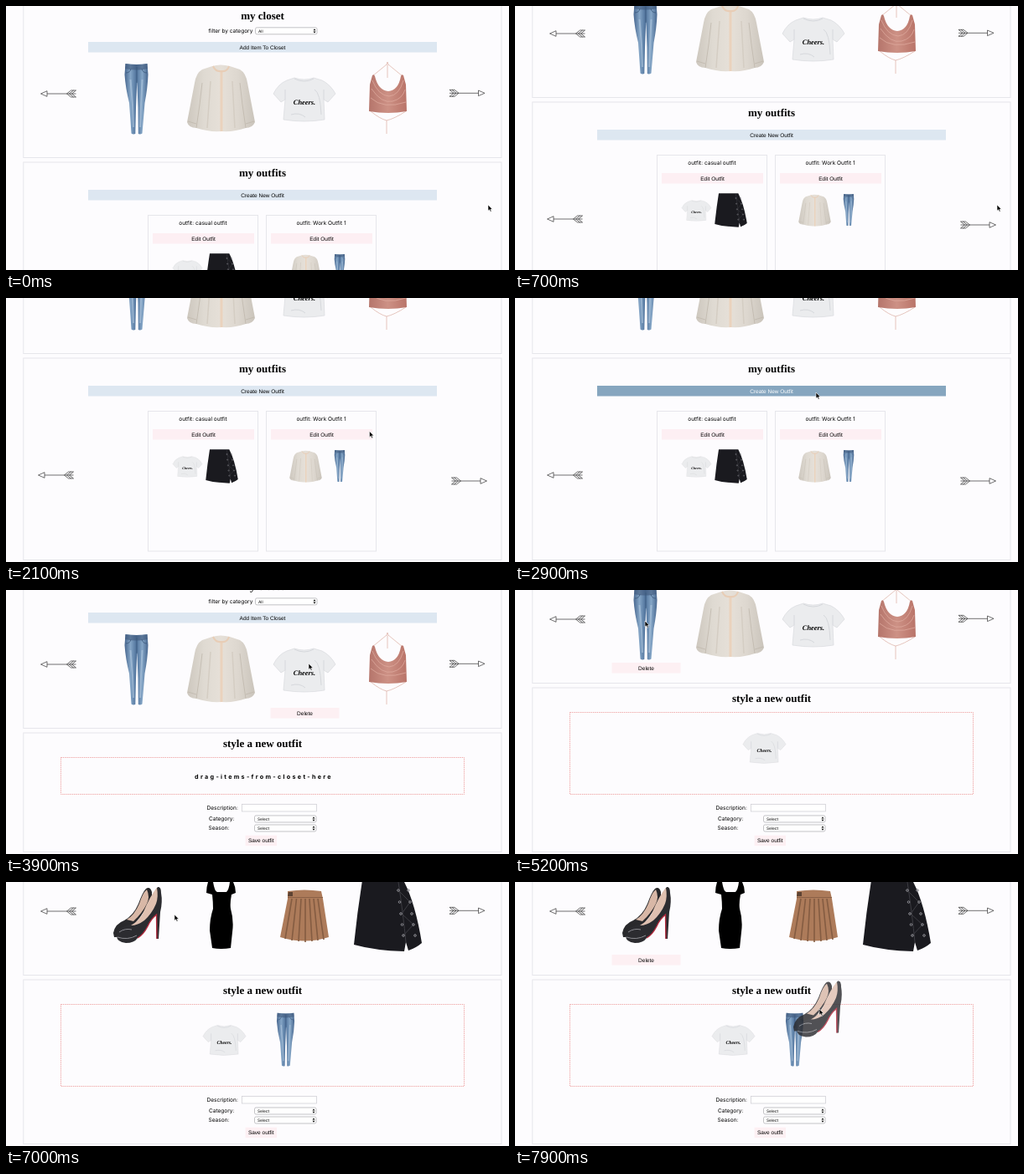
Write an HTML page that moves like this. It is 600 px wide and 316 px high and loops after 8000 ms.

```html
<!DOCTYPE html>
<html lang="en">
<head>
<meta charset="utf-8">
<title>my closet</title>
<style>
  html, body { margin: 0; width: 100%; height: 100%; overflow: hidden; background: #fdfcfe; }
  svg { display: block; width: 600px; height: 316px; }
  text { font-family: Inter, "Noto Sans", sans-serif; font-size: 6.55px; fill: #000; text-rendering: geometricPrecision; }
  .btn { font-family: "Liberation Sans", Arial, sans-serif; font-size: 6.5px; }
  .title { font: bold 13px "Liberation Serif", "Times New Roman", serif; }
  .tee { font: italic bold 8.4px "Liberation Serif", serif; }
  .opt { font-size: 4.8px; }
  .drop { font-size: 7.2px; font-weight: 700; letter-spacing: 2.3px; }
  .mid { text-anchor: middle; }
  .box { fill: none; stroke: #e6e6eb; }
  .line { fill: none; }
</style>
</head>
<body>
<svg id="stage" viewBox="0 0 600 316"></svg>
<script>
const stage = document.getElementById('stage');

// Garments: centre and drawing, all in closet page coordinates
const items = {
  jeans: [155.5, 111, `
    <path fill="url(#denim)" d="M142.500 69Q156 71 168.500 69L169.500 82Q169 98 165.500 116L162.500 152.500Q160 154 157.800 153L157.500 122 156.300 90 155 122 154.300 153Q151.500 154 149.500 152.500L147 116Q142.500 98 141.500 82Z"/>
    <path fill="#40597c" opacity=".6" d="M142.500 69Q156 71 168.500 69L169 75Q156 78 142 75Z"/>
    <path class="line" stroke="#3c587c" stroke-width=".8" d="M156 73V92M143 80Q148 80 149 75M168 80Q163 80 162 75"/>
    <path class="line" stroke="#b4cbe0" stroke-width="2" opacity=".55" d="M148.500 88L151 118 152 145M162.500 88L161 118 160 145"/>`],
  shirt: [256.5, 110, `
    <path fill="url(#cream)" d="M246 72Q256 69 267 72L279 76Q286 80 288 92L297 139Q294 146 286 146 272 151 257 150 242 151 227 146 218 146 216 139L225 92Q227 80 234 76Z"/>
    <path class="line" stroke="#bfb8ac" stroke-width=".8" d="M234 92L231 118 227 146M279 92L282 118 286 146M217 138L227 141M296 138L286 141"/>
    <path class="line" stroke="#d4cdc3" stroke-width="1.5" d="M244 90L240 146M270 90L273 146"/>
    <path class="line" stroke="#ead2bd" stroke-width="3" d="M257 77V150"/>
    <path class="line" stroke="#e8cdb6" stroke-width="2" d="M247 72Q250 79 257 78 264 79 266 72"/>`],
  tee: [356, 112, `
    <path fill="#ebecee" stroke="#d9dade" stroke-width=".7" d="M344 86Q356 90 367 86L377 89Q387 94 393 105L384 115 379 112 380 136Q356 140 331 136L333 112 328 115 319 105Q325 93 335 89Z"/>
    <path class="line" stroke="#d6d8dc" d="M344 87Q356 93 367 87M333 100V112M379 100V112M340 130Q350 127 357 133M368 100Q375 104 376 130"/>
    <text class="tee mid" x="356" y="118">Cheers.</text>`],
  halter: [455.5, 110, `
    <path class="line" stroke="#dcaea3" stroke-width=".7" d="M437 84L454 70 455 67M473 84L456 70 455 67M455 70V86M435 126Q446 135 454 137 463 135 477 126M454 137V153"/>
    <path fill="url(#rose)" d="M434 94L437 83Q439 81 440 84 444 101 456 102 468 101 471 84 472 81 474 83L477 94 478 126Q456 130 433 126Z"/>
    <path class="line" stroke="#dfab9f" opacity=".75" d="M437 89Q444 107 457 108 469 107 474 89M436 99Q448 117 461 114 473 111 476 100M435 110Q450 124 477 115"/>`],
  shoes: [157, 109, `<g transform="translate(0 70)">
    <path fill="#29292c" d="M128 61Q130 50 141 46 152 40 158 26 163 12 167 8 172 5 174 12V26Q166 32 160 42L148 56Q138 67 129 66Z"/>
    <path fill="#d8b7a6" d="M144 45Q153 40 159 26 163 13 168 9 172 18 168 26 162 38 152 47Z"/>
    <path fill="#2c2c30" d="M132 64Q133 55 144 52 153 50 160 44 170 36 174 22 177 10 181 6 185 5 185 13 187 24 184 36L182 68H179.500L179 40Q173 44 169 53 163 64 157 67 153 73 143 73 132 72 132 64Z"/>
    <path fill="#dfc0b0" d="M149 52Q158 47 163 38 172 16 180 7 182 18 179 26 174 38 165 46 157 52 149 52Z"/>
    <path class="line" stroke="#b32a3d" stroke-width="1.4" d="M157 67Q164 63 169 53 173 44 179.500 39L180 68"/>
    <path class="line" stroke="#8b8b90" d="M135 60Q142 55 150 57M133 66Q145 70 156 64"/></g>`],
  dress: [257, 110, `
    <path transform="translate(0 70)" d="M241 0H247Q249 12 252 12L263 12Q266 9 267 0H271Q274 6 274 13L269 15Q267 26 268 32 272 46 270 60L268 79Q257 81 246 79L243 58Q243 44 247 32 247 24 246 15L239 13Q239 6 241 0Z"/>`],
  pleats: [356, 110, `<g transform="translate(0 70)">
    <path fill="#ad7b5a" d="M336 11Q356 8 376 11L378 20 385 66Q356 75 327 66L336 20Z"/>
    <path class="line" stroke="#845c42" stroke-width="1.6" d="M341 20L333 68M346.500 20L341 70M352 20L349 71M357 20V72M362 20L365 71M367 20L372 70M372 20L379 69"/>
    <path class="line" stroke="#8a6046" d="M336 18.500H378"/>
    <path fill="#5d4333" d="M337 12H342V17H336Z"/></g>`],
  skirt: [455.5, 110.5, `<g transform="translate(0 70)">
    <path fill="#1a1a1f" d="M425 -2H474Q488 24 496 73 489 79 480 82L477 72 475 83Q440 82 415 75 419 36 425 -2Z"/>
    <path class="line" stroke="#3c3c42" d="M468 0Q474 40 477 72M469 11L482 24 472 38 486 51 474 64"/>
    <g class="line" stroke="#8b8b91">${[10, 24, 38, 51, 64].map((y, i) =>
      `<circle cx="${468 + i * 1.5}" cy="${y}" r="1.3"/><circle cx="${480 + i * 2}" cy="${y}" r="1.3"/>`).join('')}</g></g>`]
};
const racks = [['jeans', 'shirt', 'tee', 'halter'], ['shoes', 'dress', 'pleats', 'skirt']];
const slots = [156, 256, 356, 456];

const put = (name, x, y, k) =>
  `<use href="#${name}" transform="translate(${x} ${y}) scale(${k}) translate(${-items[name][0]} ${-items[name][1]})"/>`;
const text = (s, x, y, cls = '') => `<text x="${x}" y="${y}" class="${cls}">${s}</text>`;
const rect = (x, y, w, h, attr) => `<rect x="${x}" y="${y}" width="${w}" height="${h}" ${attr}/>`;
const button = (s, x, y, w, fill, id = '') =>
  `<g id="${id}">${rect(x, y, w, 12.5, `fill="${fill}"`)}${text(s, x + w / 2, y + 8.5, 'btn mid')}</g>`;
const select = (s, x, y) =>
  rect(x, y, 73.5, 8, 'rx="1.8" fill="#fff" stroke="#b4b4b8" stroke-width=".8"') + text(s, x + 3.5, y + 5.8, 'opt') +
  `<path d="M${x + 69} ${y + 3.5}l1.500 -2 1.500 2zM${x + 69} ${y + 4.700}l1.500 2 1.500 -2z"/>`;
const arrow = (x, y, dir) => `<use href="#arrow" transform="translate(${x} ${y}) scale(${dir} 1)"/>`;
const gradient = (id, colors) => `<linearGradient id="${id}">${colors.map((c, i) =>
  `<stop offset="${i / (colors.length - 1)}" stop-color="${c}"/>`).join('')}</linearGradient>`;
const card = (x, title) => rect(x + .5, 250.5, 131, 167.5, 'class="box"') +
  text(title, x + 66, 262, 'mid') + button('Edit Outfit', x + 6, 272, 121, '#fdeff3');

const pink = '#fdf0f3', blue = '#dde7f1';
stage.innerHTML = `
<defs>
  ${gradient('denim', ['#48678f', '#84a5c6', '#50739c', '#84a5c6', '#48678f'])}
  ${gradient('cream', ['#cdc7be', '#dfdad2', '#e6e0d8', '#ddd7cf', '#cac4bb'])}
  ${gradient('rose', ['#b5756b', '#cd9185', '#b97469'])}
  <g id="arrow" class="line" stroke="#333" stroke-width=".7">
    <path d="M0 0L7.500 -3.300V3.300ZM7.500 0H42M31 0L36 -4H42L37 0 42 4H36ZM34 0L39 -4M34 0L39 4"/></g>
  ${Object.entries(items).map(([id, d]) => `<g id="${id}">${d[2]}</g>`).join('')}
</defs>
<g id="page">
  ${rect(20.8, -40.5, 570.2, 222, 'class="box"')}
  ${text('my closet', 306, 15.5, 'title mid')}
  ${text('filter by category', 241.5, 32)}
  ${select('All', 297.5, 25.8)}
  ${button('Add Item To Closet', 98, 43, 416, blue)}
  ${arrow(41.5, 105, 1)}${arrow(571, 104.3, -1)}
  ${racks.map((r, i) => `<g id="rack${i}">${r.map(n => `<use href="#${n}"/>`).join('')}</g>`).join('')}
  ${button('Delete', -41, 157, 82, pink, 'del')}
  <g id="outfits">
    ${rect(20.8, 187, 570.2, 241.500, 'class="box"')}
    ${text('my outfits', 306, 203.7, 'title mid')}
    ${button('Create New Outfit', 98, 220, 416, blue, 'create')}
    ${card(169, 'outfit: casual outfit')}${card(310, 'outfit: Work Outfit 1')}
    ${put('tee', 216.5, 317, .475)}${put('skirt', 257.5, 316.5, .475)}
    ${put('shirt', 357.5, 316.5, .475)}${put('jeans', 398, 316, .45)}
    ${arrow(38.5, 327, 1)}${arrow(573.5, 334, -1)}
  </g>
  <g id="style">
    <rect id="panel" x="20.8" y="187" width="570.2" class="box"/>
    ${text('style a new outfit', 306, 203.7, 'title mid')}
    <rect id="zone" x="65.5" y="216.5" width="481" fill="none" stroke="#efa6a6" stroke-dasharray="1.3 1"/>
    <g id="hint">${text('drag-items-from-closet-here', 307.5, 242, 'drop mid')}</g>
  </g>
</g>
<g id="form">
  ${text('Description:', 239.5, 262.7)}
  ${rect(281.5, 256.5, 89, 8.5, 'fill="#fff" stroke="#d2d2d6" stroke-width=".8"')}
  ${text('Category:', 242, 275.7)}${select('Select', 296.5, 270)}
  ${text('Season:', 241.5, 286.7)}${select('Select', 296.5, 281)}
  ${button('Save outfit', 285.5, 293.7, 37.5, pink)}
</g>
<g id="one">${put('tee', 297.5, 189.5, .69)}</g>
<g id="two">${put('tee', 260.5, 189.5, .69)}${put('jeans', 333.5, 188.5, .755)}</g>
<use id="ghost" opacity=".82"/>
<path id="cursor" stroke="#fff" stroke-width=".6" d="M0 0V7.200L1.700 5.700 2.800 8.300 4.100 7.800 3 5.300H5.200Z"/>`;

const el = {};
stage.querySelectorAll('[id]').forEach(e => el[e.id] = e);
const show = (id, on) => el[id].style.display = on ? '' : 'none';
const move = (id, x, y) => el[id].setAttribute('transform', `translate(${x} ${y})`);

// Value of keyed tracks [time, ...values] with eased steps
function track(keys, t) {
  const i = keys.findIndex(k => k[0] > t);
  if (i < 1) return keys[i ? keys.length - 1 : 0].slice(1);
  const a = keys[i - 1], b = keys[i], p = (t - a[0]) / (b[0] - a[0]), e = p * p * (3 - 2 * p);
  return a.slice(1).map((v, j) => v + (b[j + 1] - v) * e);
}

const scrollKeys = [[0, 0], [700, 72], [1300, 72], [1700, 115]];
const path = [
  [0, 575, 238], [900, 575, 238], [1300, 552, 228], [1700, 508, 206], [2500, 359, 113],
  [3100, 359, 113], [3500, 361, 88], [3900, 361, 88], [4500, 345, 200], [4600, 345, 200],
  [5100, 155, 37], [5300, 155, 37], [5850, 330, 200], [5900, 330, 200], [6200, 531, 38],
  [6400, 562, 35], [6600, 562, 35], [7100, 159, 39.5], [7300, 159, 39.5], [7900, 363, 152], [8000, 366, 154]
];
const drags = [
  { from: 3900, to: 4600, item: 'tee', slot: 2 },
  { from: 5300, to: 5900, item: 'jeans', slot: 0 },
  { from: 7300, to: 8000, item: 'shoes', slot: 0 }
];

function draw(t) {
  const styling = t >= 3000, filled = t >= 4600, paired = t >= 5900, next = t >= 6600;
  const scroll = filled ? 70 : styling ? 16 : Math.round(track(scrollKeys, t)[0]);
  const [x, y] = track(path, t);
  const py = y + scroll;

  move('page', 0, -scroll);
  move('cursor', x, y);
  show('outfits', !styling);
  show('style', styling);
  show('form', styling);
  show('hint', !filled);
  show('one', filled && !paired);
  show('two', paired);
  show('rack0', !next);
  show('rack1', next);
  el.panel.setAttribute('height', scroll + 126.5);
  el.zone.setAttribute('height', scroll + 28);

  const over = !styling && x > 98 && x < 514 && py > 220 && py < 232.5;
  el.create.firstChild.setAttribute('fill', over ? '#86a6bf' : blue);
  el.create.lastChild.style.fill = over ? '#fff' : '';

  const drag = drags.find(d => t > d.from && t < d.to);
  const hover = drag ? drag.slot : slots.findIndex(s => Math.abs(x - s) < 41 && py > 66 && py < 157);
  show('del', hover >= 0);
  if (hover >= 0) move('del', slots[hover] + .5, 0);

  show('ghost', drag);
  if (drag) {
    const [gx, gy] = track(path, drag.from);
    el.ghost.setAttribute('href', '#' + drag.item);
    move('ghost', x - gx, y - gy - scroll);
  }
}

const start = performance.now();
function tick() {
  draw(Math.floor((performance.now() - start) % 8000 / 100) * 100);
  requestAnimationFrame(tick);
}
tick();
</script>
</body>
</html>
```
